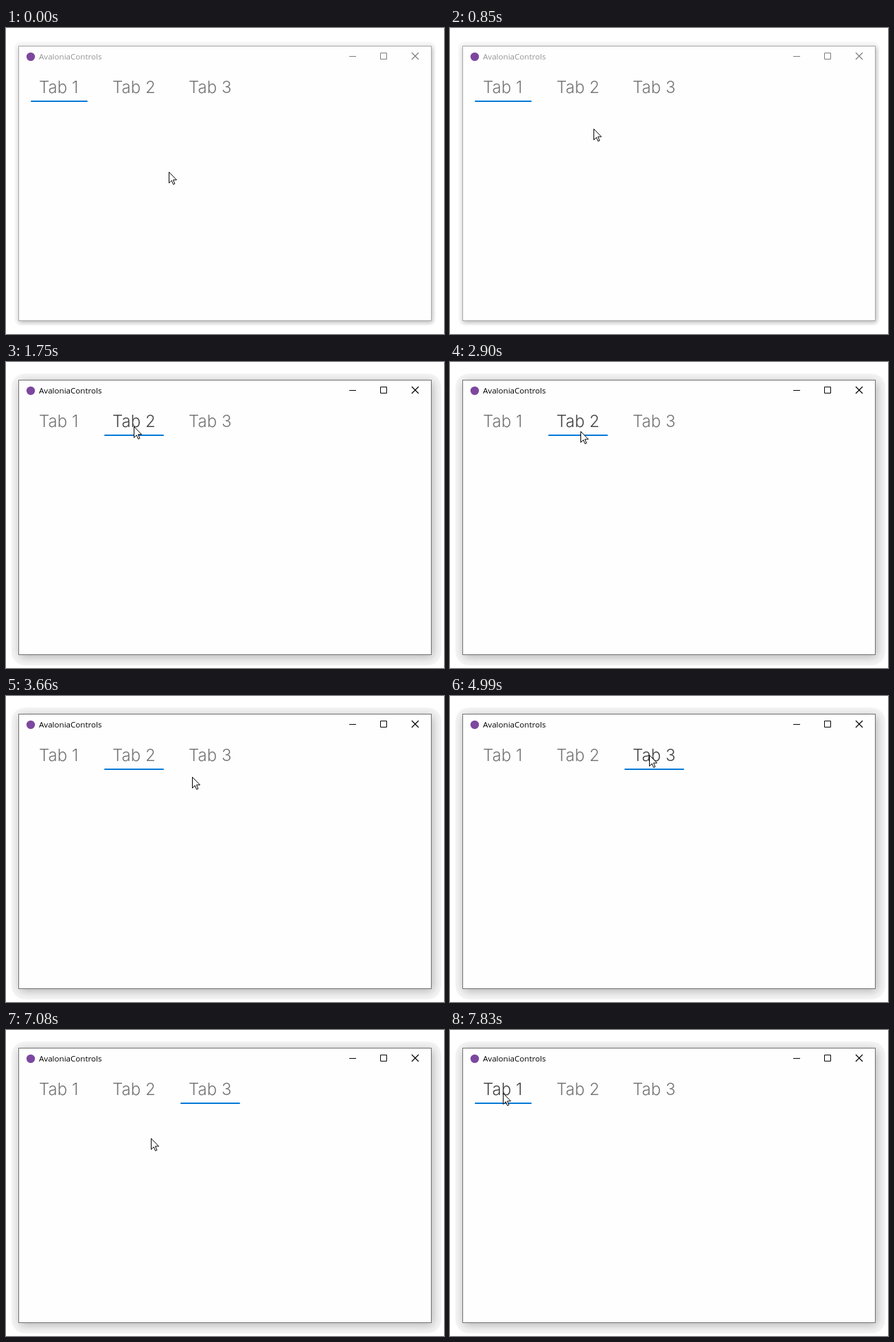
An HTML page for the animation above (8000 ms loop, 638x447 px).

```html
<!DOCTYPE html>
<html lang="en">
<head>
<meta charset="utf-8">
<title>Tab control</title>
<style>
  html, body { margin: 0; width: 100%; height: 100%; overflow: hidden; background: #fff; }
  #stage { position: relative; width: 638px; height: 447px; overflow: hidden; --line: #a9a9a9; --glyph: #7c7c7c; --title: #949494; }
  #stage.active { --line: #707070; --glyph: #000; --title: #000; }
  .halo { position: absolute; left: 12px; top: 20px; width: 613px; height: 414px; border-radius: 9px; background: #f8f8f8; }
  .window { position: absolute; left: 18px; top: 26px; width: 600px; height: 400px; background: #fefefe;
    border: 1px solid var(--line); box-shadow: 1px 2px 6px rgba(0, 0, 0, .27); }
  .active .halo { left: 8px; top: 17px; width: 626px; height: 426px; border-radius: 20px; background: #f5f5f5; }
  .active .window { box-shadow: 2px 3px 13px rgba(0, 0, 0, .28); }
  svg { position: absolute; left: 0; top: 0; }
  .title { font: 11.6px "Open Sans", "Noto Sans", sans-serif; fill: var(--title); }
  .glyph { fill: none; stroke: var(--glyph); }
  .tab { font: 300 24px Inter, sans-serif; font-optical-sizing: none; fill: #757575; }
  .tab.hover { fill: #444; }
  #bar { fill: #0078d7; }
</style>
</head>
<body>
<div id="stage">
  <div class="halo"></div>
  <div class="window"></div>
  <svg width="638" height="447">
    <circle cx="36" cy="42" r="6.2" fill="#7d479f"/>
    <text class="title" x="48" y="46">AvaloniaControls</text>
    <path class="glyph" d="M500 41.5h10M545.5 36.5h9v9h-9z"/>
    <path class="glyph" stroke-width="1.2" d="M591 36l10 10M601 36l-10 10"/>
    <text class="tab" x="48" y="95">Tab 1</text>
    <text class="tab" x="155" y="95">Tab 2</text>
    <text class="tab" x="266" y="95">Tab 3</text>
    <rect id="bar" y="106" height="2" rx="1"/>
    <path id="cursor" fill="#fff" stroke="#000" d="M.5 .5V16.5L4.2 12.8L6.7 18.5L8.9 17.5L6.5 11.9H11.5Z"/>
  </svg>
</div>
<script>
const LOOP = 8000, TICK = 60;
const stage = document.getElementById('stage');
const bar = document.getElementById('bar');
const cursor = document.getElementById('cursor');
const labels = [...document.querySelectorAll('.tab')];

const tabs = [{ x: 36, w: 83 }, { x: 143, w: 87 }, { x: 254, w: 87 }];
// each click selects the next tab
const clicks = [1690, 4990, 7830];
const home = { x: 237, y: 210 };
// pointer strokes: power above 1 slows down at the end, dip bends the line downwards
const strokes = [
  { from: 440, to: 1320, x: 186, y: 94, power: 1.5, dip: 0 },
  { from: 2840, to: 3660, x: 271, y: 118, power: .7, dip: 24 },
  { from: 3660, to: 4060, x: 290, y: 86, power: 1.5, dip: 0 },
  { from: 6560, to: 7080, x: 211, y: 158, power: .9, dip: 8 },
  { from: 7080, to: 7720, x: 77, y: 92, power: 3, dip: 11 }
];

function pointerAt(t) {
  let { x, y } = home;
  for (const s of strokes) {
    if (t < s.from) break;
    const ticks = Math.floor((t - s.from) / TICK);
    const u = t >= s.to ? 1 : ticks * TICK / (s.to - s.from);
    const p = 1 - (1 - u) ** s.power;
    x += (s.x - x) * p;
    y += (s.y - y) * p + s.dip * Math.sin(Math.PI * u);
  }
  return { x: Math.round(x), y: Math.round(y) };
}

function draw(now) {
  const t = now % LOOP;
  const { x, y } = pointerAt(t);
  const count = clicks.filter(c => c <= t).length;
  const selected = tabs[count % tabs.length];
  stage.classList.toggle('active', count > 0);
  bar.setAttribute('x', selected.x);
  bar.setAttribute('width', selected.w);
  cursor.setAttribute('transform', `translate(${x} ${y})`);
  tabs.forEach((tab, i) => {
    const over = y < 108 && x >= tab.x && x < tab.x + tab.w;
    labels[i].classList.toggle('hover', over);
  });
  requestAnimationFrame(draw);
}
draw(performance.now());
</script>
</body>
</html>
```
